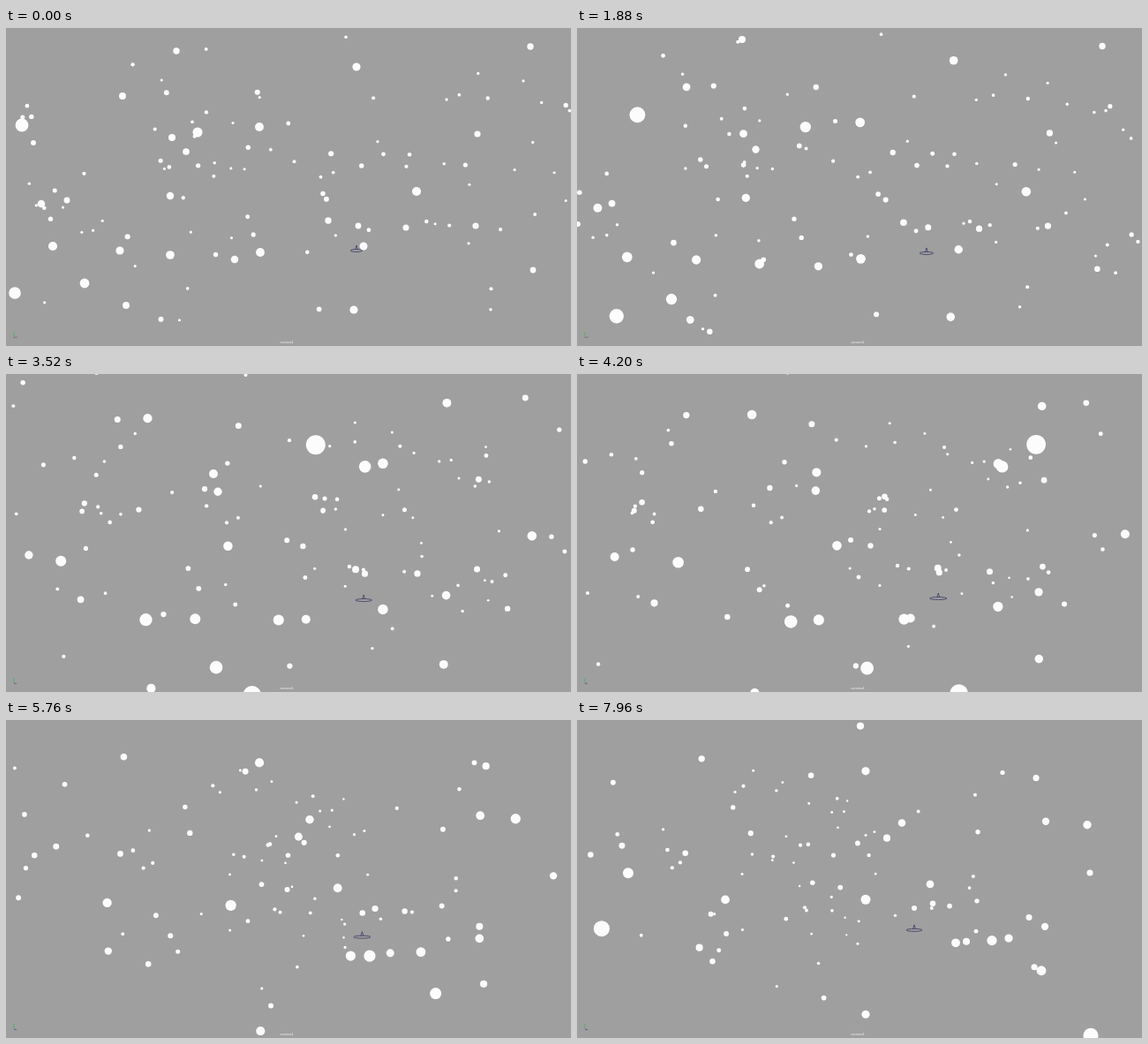
These frames come from a looping animation (640 px wide and 360 px high, 8 s). An HTML page with a canvas:

```html
<!DOCTYPE html>
<html lang="en">
<head>
<meta charset="utf-8">
<title>Camera move through a cloud of spheres</title>
<style>
  html, body { margin: 0; width: 100%; height: 100%; overflow: hidden; background: #9f9f9f; }
  canvas { display: block; width: 640px; height: 360px; }
</style>
</head>
<body>
<canvas id="stage" width="640" height="360"></canvas>
<script>
const ctx = document.getElementById('stage').getContext('2d');
const LOOP = 8000, STEP = 40;

// Camera: slides along a straight line while turning; lengths are in sphere radii.
const FOCAL = 622, CX = 320, HORIZON = 160, TURN = 0.952;
const MOVE = { x: -158, y: 1.2, z: 80 };

// Nearest spheres: start x, start y and end x on screen; depth follows from the two x values.
const near = [
  18,110,732,  10,300,678,  53,247,470,  89,289,526,  129,252,429,
  186,257,489, 259,262,441, 288,254,530, 405,247,512, 397,44,520,
  287,112,531, 217,118,578, 465,185,581, 534,120,454, 594,21,482,
  394,319,518, 532,224,453, 597,274,452, 365,218,403, 399,224,382,
  453,226,422, 132,77,327,  188,124,368, 204,140,351, 186,190,400,
  40,199,327,  69,195,168,  136,314,327, 193,26,321,
  -192,201,28, -194,316,582, -30,172,58
];

function place(x, y, z) {
  return { x: (x - CX) / FOCAL * z, y: (y - HORIZON) / FOCAL * z, z };
}

function fromEnds(x0, y0, x1) {
  const a = (x0 - CX) / FOCAL, b = (x1 - CX) / FOCAL;
  const c = Math.cos(TURN), s = Math.sin(TURN);
  const z = (MOVE.x * c - MOVE.z * s - b * (MOVE.x * s + MOVE.z * c)) /
            (a * c - s - b * (a * s + c));
  return place(x0, y0, z);
}

let seed = 41;
function random() {
  seed = (seed * 1664525 + 1013904223) % 4294967296;
  return seed / 4294967296;
}

const spheres = [];
for (let i = 0; i < near.length; i += 3) {
  spheres.push(fromEnds(near[i], near[i + 1], near[i + 2]));
}
// Small distant spheres, denser towards the middle height
for (let i = 0; i < 104; i++) {
  const x = 10 + 740 * random();
  const y = 350 * (random() + random()) / 2;
  const r = 1.55 + 1.5 * random() ** 2;
  spheres.push(place(x, y, FOCAL / r));
}
const craft = fromEnds(397, 252, 382);

function project(p, s) {
  const c = Math.cos(TURN * s), n = Math.sin(TURN * s);
  const x = p.x - MOVE.x * s, z = p.z - MOVE.z * s;
  const depth = x * n + z * c, r = FOCAL / depth;
  return {
    x: CX + r * (x * c - z * n),
    y: HORIZON + r * (p.y - MOVE.y * s),
    r, visible: depth > 15
  };
}

function line(color, ...pts) {
  ctx.strokeStyle = color;
  ctx.beginPath();
  for (let i = 0; i < pts.length; i += 2) ctx.lineTo(pts[i], pts[i + 1]);
  ctx.stroke();
}

function drawCraft(s) {
  const { x, y, r } = project(craft, s);
  const w = r * (2 + Math.sin(TURN * s * 1.6));
  ctx.strokeStyle = '#3c3c66';
  ctx.beginPath();
  ctx.ellipse(x, y, w, 1.5, 0, 0, Math.PI * 2);
  ctx.stroke();
  line('#3c3c66', x - 1.5, y - 1, x, y - 6, x + 1.5, y - 1);
}

function drawOverlay(s) {
  const c = Math.cos(TURN * s), n = Math.sin(TURN * s);
  line('#b05a50', 9, 350, 9 + 4 * c, 350 + n);
  line('#5058b0', 9, 350, 9 + 4 * n, 350 + c);
  line('#3cb85c', 9, 350, 9, 344);
  ctx.fillStyle = '#f4f4f4';
  ctx.font = '4px "Liberation Sans", sans-serif';
  ctx.textAlign = 'center';
  ctx.fillText('camera1', 318, 357);
}

function draw(ms) {
  const t = Math.floor(ms % LOOP / STEP) * STEP / LOOP;
  const s = t * t * (3 - 2 * t);
  ctx.fillStyle = '#9f9f9f';
  ctx.fillRect(0, 0, 640, 360);
  ctx.lineWidth = 0.8;
  drawCraft(s);
  ctx.fillStyle = '#fcfcfc';
  for (const p of spheres) {
    const d = project(p, s);
    if (!d.visible) continue;
    ctx.beginPath();
    ctx.arc(d.x, d.y, d.r, 0, Math.PI * 2);
    ctx.fill();
  }
  drawOverlay(s);
}

const start = performance.now();
function tick() {
  draw(performance.now() - start);
  requestAnimationFrame(tick);
}
tick();
</script>
</body>
</html>
```
